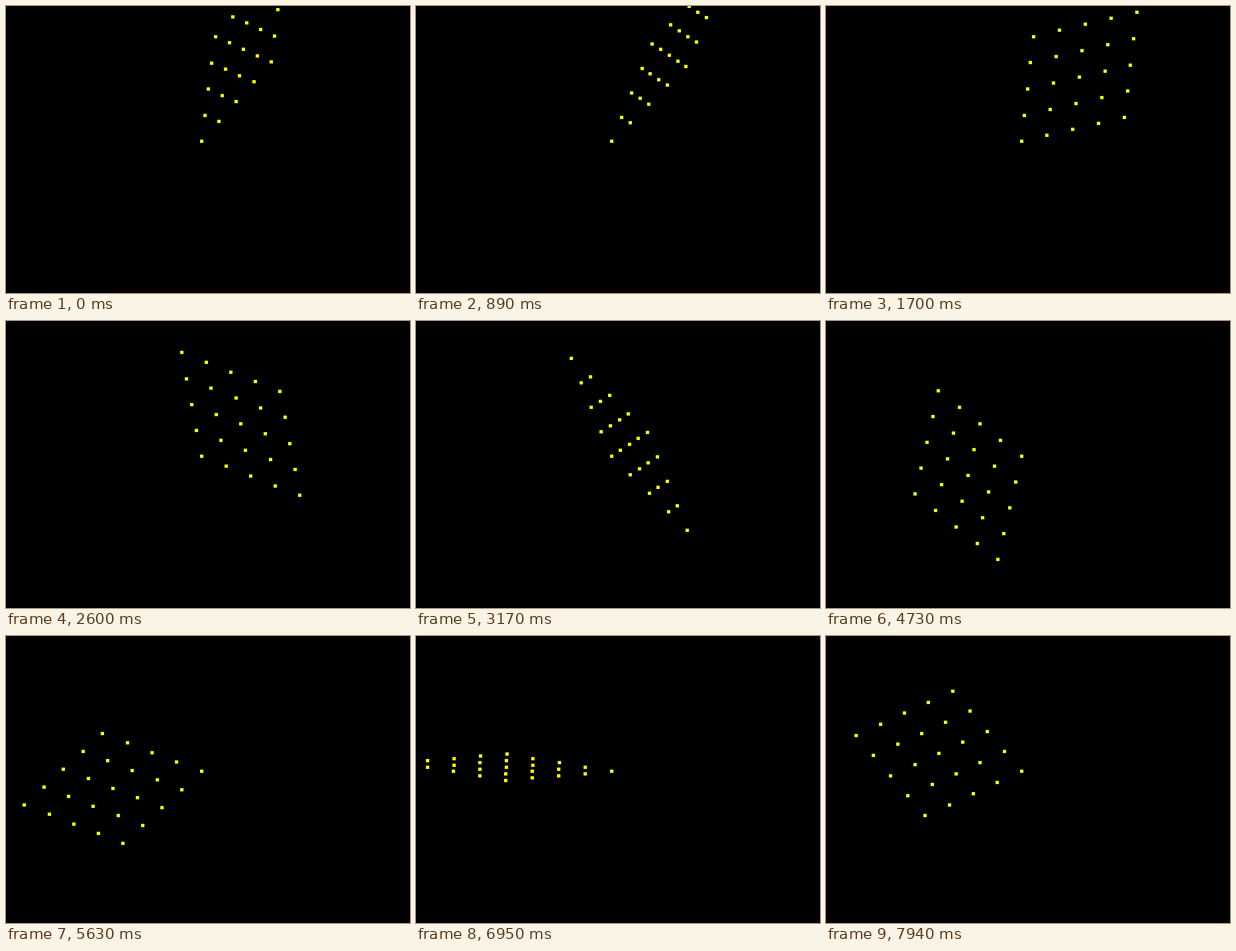
Write an HTML page with a canvas that moves like this. It is 610 px wide and 434 px high and loops after 7990 ms.

```html
<!DOCTYPE html>
<html lang="en">
<head>
<meta charset="utf-8">
<title>Rotating lattice</title>
<style>
  html, body { margin: 0; width: 100%; height: 100%; overflow: hidden; background: #000; }
  canvas { display: block; }
</style>
</head>
<body>
<canvas id="stage" width="610" height="434"></canvas>
<script>
const ctx = document.getElementById('stage').getContext('2d');
const LOOP = 7990, ORIGIN_X = 295, ORIGIN_Y = 204, SPACING = 40, COUNT = 5;
const START_P = 48.755, START_Q = 82.456;   // degrees, counter-clockwise
const TICK_TURN = 2 / 3, TICKS_PER_STEP = 1.4, LAST_STEP = 167;

// The step clock runs evenly between these [ms, step] points.
const CLOCK = [[0, 0], [840, 19], [3270, 70], [3870, 81], [7940, LAST_STEP]];

function stepAt(time) {
  const shifted = time + 5;   // absorbs the 10 ms rounding of step times
  let i = 1;
  while (i < CLOCK.length - 1 && shifted >= CLOCK[i][0]) i++;
  const [t0, s0] = CLOCK[i - 1], [t1, s1] = CLOCK[i];
  const step = Math.floor(s0 + (shifted - t0) / (t1 - t0) * (s1 - s0));
  return Math.min(LAST_STEP, step);
}

function latticeVector(degrees) {
  const angle = degrees * Math.PI / 180;
  return { x: SPACING * Math.cos(angle), y: SPACING * Math.sin(angle) };
}

function draw(time) {
  // The second vector turns backwards at twice the speed of the first.
  const turn = TICK_TURN * Math.round(TICKS_PER_STEP * stepAt(time));
  const p = latticeVector(START_P + turn);
  const q = latticeVector(START_Q - 2 * turn);

  ctx.fillStyle = '#000';
  ctx.fillRect(0, 0, 610, 434);
  ctx.fillStyle = '#ff0';
  for (let i = 0; i < COUNT; i++) {
    for (let j = 0; j < COUNT; j++) {
      const x = ORIGIN_X + Math.floor(i * p.x + j * q.x);
      const y = ORIGIN_Y - Math.floor(i * p.y + j * q.y);
      ctx.fillRect(x - 2, y - 2, 5, 5);
    }
  }
}

const begin = performance.now();
function tick() {
  draw((performance.now() - begin) % LOOP);
  requestAnimationFrame(tick);
}
tick();
</script>
</body>
</html>
```
